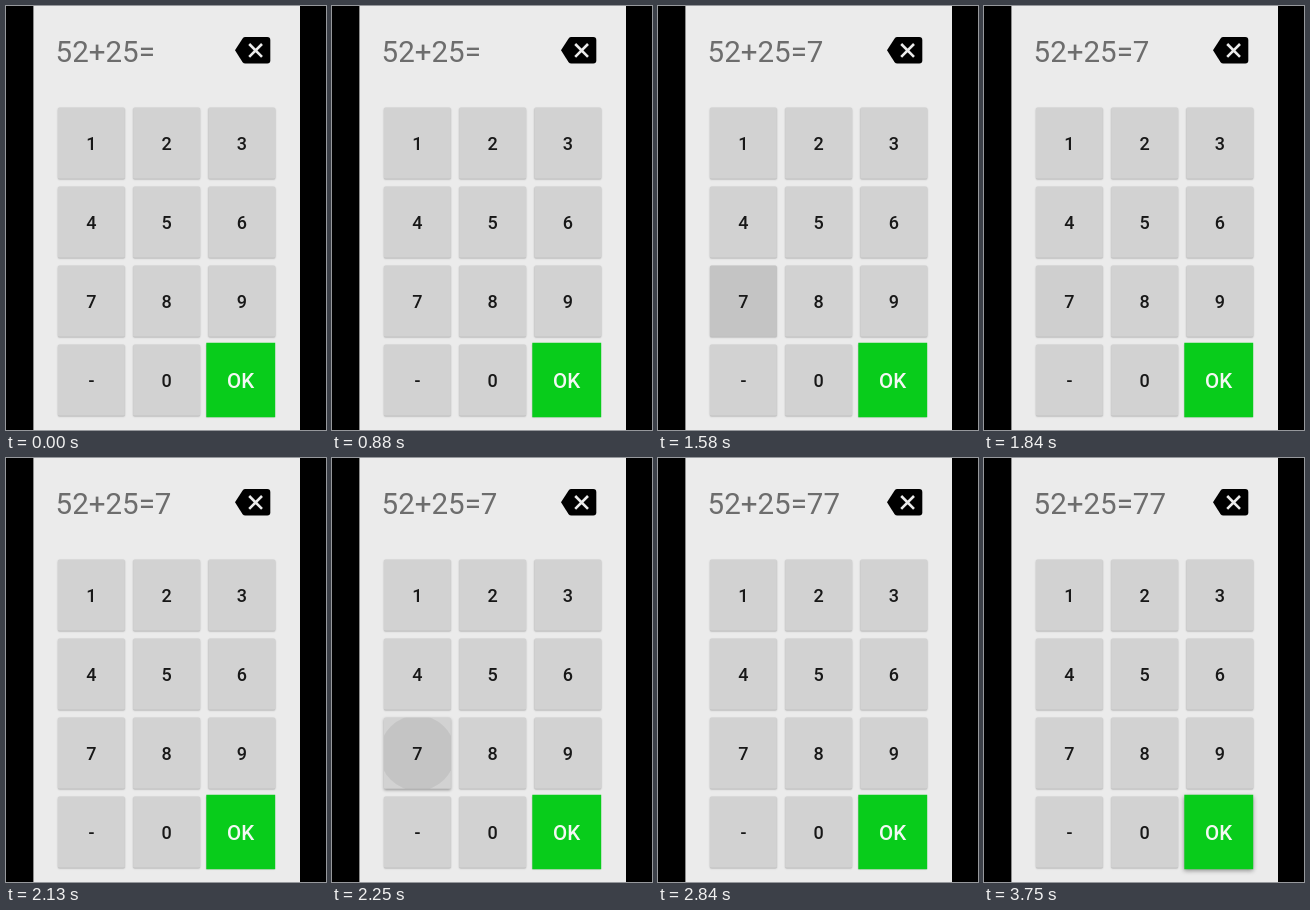
These frames come from a looping animation (320 px wide and 424 px high, 3.88 s). An HTML page with a canvas:

```html
<!DOCTYPE html>
<html lang="en">
<head>
<meta charset="utf-8">
<title>Sum keypad</title>
<style>
html, body { margin: 0; width: 100%; height: 100%; overflow: hidden; background: #000; }
canvas { display: block; width: 320px; height: 424px; }
</style>
</head>
<body>
<canvas id="stage"></canvas>
<script>
const LOOP = 3880;
const PRESSES = [1210, 2130];
const TYPE_DELAY = 170;
const OK_PRESS = 3670;
const FONT = 'Roboto, "Noto Sans", sans-serif';
const KEYS = ['1', '2', '3', '4', '5', '6', '7', '8', '9', '-', '0'];

const canvas = document.getElementById('stage');
const ctx = canvas.getContext('2d');
const scale = window.devicePixelRatio || 1;
canvas.width = 320 * scale;
canvas.height = 424 * scale;
ctx.scale(scale, scale);

const clamp = v => Math.max(0, Math.min(1, v));
const ease = v => 1 - (1 - clamp(v)) ** 2;

function box(x, y, w, h, r, color) {
  ctx.fillStyle = color;
  ctx.beginPath();
  ctx.roundRect(x, y, w, h, r);
  ctx.fill();
}

function raisedBox(x, y, w, h, r, color, lift) {
  ctx.save();
  ctx.shadowColor = `rgba(0,0,0,${0.28 + 0.12 * lift})`;
  ctx.shadowBlur = (1.5 + 3 * lift) * scale;
  ctx.shadowOffsetY = (0.8 + 1.2 * lift) * scale;
  box(x, y, w, h, r, color);
  ctx.restore();
}

function label(text, x, y, size, weight, color, align = 'center') {
  ctx.font = `${weight} ${size}px ${FONT}`;
  ctx.textAlign = align;
  ctx.fillStyle = color;
  ctx.fillText(text, x, y);
}

function backspace() {
  ctx.fillStyle = '#000';
  ctx.beginPath();
  ctx.moveTo(229, 44.3);
  ctx.lineTo(236.6, 32.4);
  ctx.quadraticCurveTo(237.6, 31, 239.4, 31);
  ctx.arcTo(264.3, 31, 264.3, 34, 3);
  ctx.arcTo(264.3, 57.6, 261.3, 57.6, 3);
  ctx.lineTo(239.4, 57.6);
  ctx.quadraticCurveTo(237.6, 57.6, 236.6, 56.2);
  ctx.closePath();
  ctx.fill();
  ctx.strokeStyle = '#ebebeb';
  ctx.lineWidth = 2.6;
  ctx.beginPath();
  ctx.moveTo(243.2, 38); ctx.lineTo(256, 50.8);
  ctx.moveTo(256, 38); ctx.lineTo(243.2, 50.8);
  ctx.stroke();
}

// Touch ripple: spreads from the middle of the key, then fades
function ripple(x, y, w, h, age) {
  if (age < 0 || age > 710) return;
  const alpha = 0.065 * clamp(age / 80) * (1 - clamp((age - 400) / 310));
  ctx.save();
  ctx.beginPath();
  ctx.roundRect(x, y, w, h, 1.5);
  ctx.clip();
  ctx.fillStyle = `rgba(0,0,0,${alpha})`;
  ctx.beginPath();
  ctx.arc(x + w / 2, y + h / 2, 12 + 40 * ease(age / 300), 0, Math.PI * 2);
  ctx.fill();
  ctx.restore();
}

function draw(t) {
  ctx.fillStyle = '#000';
  ctx.fillRect(0, 0, 320, 424);
  ctx.fillStyle = '#ebebeb';
  ctx.fillRect(27.4, 0, 266.6, 424);

  const typed = PRESSES.filter(p => t >= p + TYPE_DELAY).length;
  label('52+25=' + '7'.repeat(typed), 49.6, 56.3, 29.5, 400, '#6d6d6d', 'left');
  backspace();

  KEYS.forEach((key, i) => {
    const x = 51.9 + (i % 3) * 75.2;
    const y = 101.4 + Math.floor(i / 3) * 79;
    const ages = key === '7' ? PRESSES.map(p => t - p) : [];
    const lift = Math.max(0, ...ages.map(a => clamp(a / 100) * (1 - clamp((a - 200) / 150))));
    raisedBox(x, y, 67, 71.4, 1.5, '#d2d2d2', lift * 0.5);
    ages.forEach(age => ripple(x, y, 67, 71.4, age));
    label(key, x + 33.5, y + 42.2, 18, 500, '#181818');
  });

  raisedBox(200.3, 336.7, 68.9, 74.5, 0, '#08cc1b', clamp((t - OK_PRESS + 40) / 120));
  label('OK', 234.6, 382.1, 20.5, 500, '#f4f8f4');
}

const start = performance.now();
function tick() {
  draw((performance.now() - start) % LOOP);
  requestAnimationFrame(tick);
}
tick();
</script>
</body>
</html>
```
